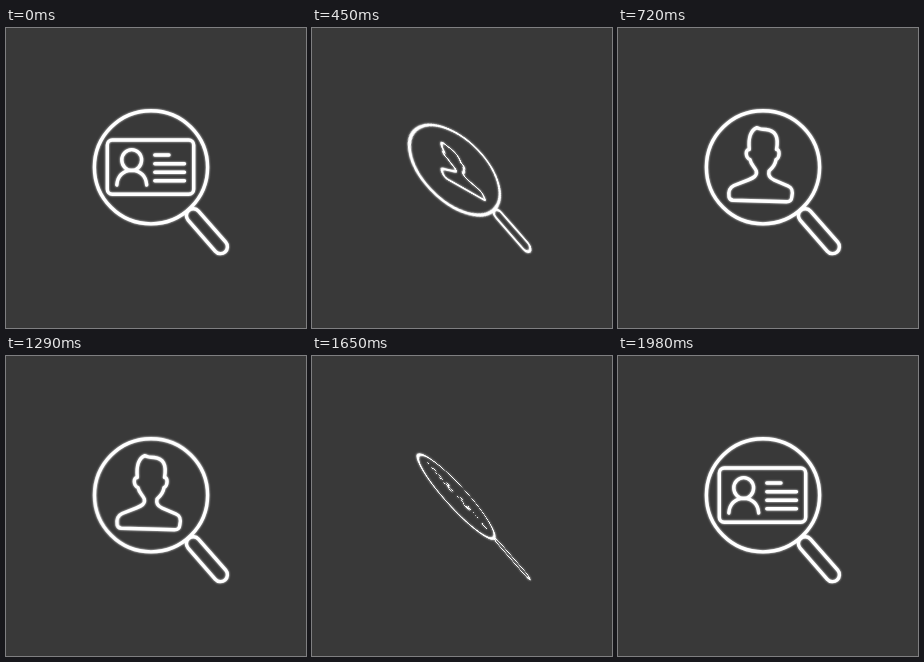
These frames come from a looping animation (300x300 px, 2.52 s). An HTML page:

```html
<!DOCTYPE html>
<html lang="en">
<head>
<meta charset="utf-8">
<title>Identity search</title>
<style>
  html, body { margin: 0; width: 100%; height: 100%; overflow: hidden; background: #393939; }
  .layer { position: absolute; left: 0; top: 0; width: 300px; height: 300px; }
  .glow { filter: drop-shadow(0 0 .8px rgba(255, 255, 255, .85)); }
  .lens { transform-origin: 173.9px 172.5px; }
  .content { transform-origin: 158.1px 154.4px; }
  svg {
    position: absolute; left: 0; top: 0; overflow: visible;
    fill: none; stroke: #fff; stroke-width: 3.4;
    stroke-linecap: round; stroke-linejoin: round;
  }
</style>
</head>
<body>
<div class="layer glow">
  <div class="layer flip lens">
    <svg width="300" height="300">
      <circle cx="145" cy="139.3" r="56.6"/>
      <rect x="57.3" y="-6.9" width="55.2" height="13.8" rx="6.9" transform="translate(145 139.3) rotate(48.8)"/>
    </svg>
    <div class="layer flip content">
      <svg id="card" width="300" height="300">
        <rect x="101.3" y="112" width="86.4" height="54.3" rx="5"/>
        <ellipse cx="125.7" cy="132" rx="9.9" ry="10.4"/>
        <path d="M110.8 157C111.5 149 116 143 125.7 142.4C135.5 143 140 149 140.7 157"/>
        <path d="M148.8 127H163M148.8 135.7H178.5M148.8 144.3H178.5M148.8 152.7H178.5"/>
      </svg>
      <svg id="bust" width="300" height="300">
        <path d="M139 99.6C133 102 130 108 131.3 121.5C127 121 127.3 130 132 131.5
          C133 137 137 139.5 138.3 143C139.5 148 135 150 130.5 151.8L116 157.5
          C111.5 159.5 110.3 164 111 169Q111.7 172 115 172.2L168.5 173.8
          Q173.5 173.8 173.8 169C175.5 162 173.5 159.5 170 158L156 152
          C151.5 150 150 147 151 143C155 139.5 157.5 136 158 131.5
          C162 130 162 121 158.5 121.5C161 108 157 102.5 148 101.5Q142 101.5 139 99.6Z"/>
      </svg>
    </div>
  </div>
</div>
<script>
  const HALF = 1260, TURN = 726, AXIS = 49 * Math.PI / 180;
  const flips = document.querySelectorAll('.flip');
  const card = document.getElementById('card');
  const bust = document.getElementById('bust');
  const axis = `${Math.cos(AXIS)}, ${Math.sin(AXIS)}, 0`;
  const ease = p => (1 - Math.cos(Math.PI * p)) / 2;

  // The inner layer turns along with the lens, so its picture is flattened twice.
  function draw(now) {
    const t = now % (2 * HALF);
    const turn = 180 * ease(Math.min(1, (t % HALF) / TURN));
    const past = turn > 90;
    const angle = past ? 180 - turn : -turn;
    const size = 1 - 0.03 * Math.sin(turn * Math.PI / 180);
    const showCard = (t < HALF) !== past;
    for (const el of flips) {
      el.style.transform = `scale(${size}) perspective(400px) rotate3d(${axis}, ${angle}deg)`;
    }
    card.style.visibility = showCard ? 'visible' : 'hidden';
    bust.style.visibility = showCard ? 'hidden' : 'visible';
  }

  const start = performance.now();
  function tick() {
    draw(performance.now() - start);
    requestAnimationFrame(tick);
  }
  tick();
</script>
</body>
</html>
```
